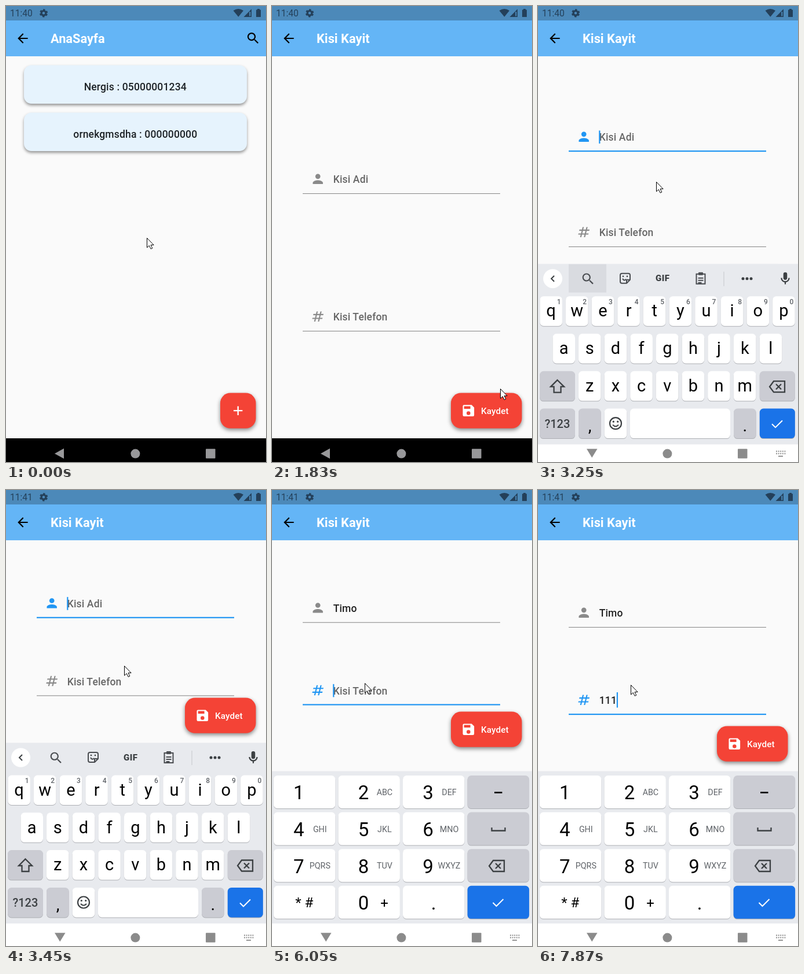
These frames come from a looping animation (449 by 789 pixels, 8 s). An HTML page:

```html
<!DOCTYPE html>
<html lang="tr">
<head>
<meta charset="utf-8">
<style>
html, body { margin: 0; width: 449px; height: 789px; overflow: hidden; }
svg { display: block; font-family: Roboto, sans-serif; }
.title { font-size: 21.8px; font-weight: 700; fill: #fff; }
.body { font-size: 17.5px; font-weight: 500; letter-spacing: .16px; }
.card { filter: drop-shadow(0 3px 2.5px #0006); }
.fab { filter: drop-shadow(0 3px 3.5px #0007); }
.mid { text-anchor: middle; }
.line { fill: none; stroke-width: 2.3; }
</style>
</head>
<body>
<svg id="stage" width="449" height="789"></svg>
<script>
const stage = document.getElementById('stage');
const BLUE = '#2196f3', RED = '#f44336', INK = '#3c4043';

const ICON = {
  back: 'M20 11H7.83l5.59-5.59L12 4l-8 8 8 8 1.41-1.41L7.83 13H20v-2z',
  search: 'M15.5 14h-.79l-.28-.27C15.41 12.59 16 11.11 16 9.5 16 5.91 13.09 3 9.5 3S3 5.91 3 9.5 5.91 16 9.5 16c1.61 0 3.09-.59 4.23-1.57l.27.28v.79l5 4.99L20.49 19l-4.99-5zm-6 0C7.01 14 5 11.99 5 9.5S7.01 5 9.5 5 14 7.01 14 9.5 11.99 14 9.5 14z',
  person: 'M12 12a4 4 0 1 0 0-8 4 4 0 0 0 0 8zm0 2c-2.67 0-8 1.34-8 4v2h16v-2c0-2.66-5.33-4-8-4z',
  hash: 'M20.5 10 21 8h-4l1-4h-2l-1 4h-4l1-4h-2L9 8H5l-.5 2h4l-1 4h-4L3 16h4l-1 4h2l1-4h4l-1 4h2l1-4h4l.5-2h-4l1-4h4zm-7 4h-4l1-4h4l-1 4z',
  save: 'M17 3H5a2 2 0 0 0-2 2v14a2 2 0 0 0 2 2h14a2 2 0 0 0 2-2V7l-4-4zm-5 16a3 3 0 1 1 0-6 3 3 0 0 1 0 6zm3-10H5V5h10v4z',
  mic: 'M12 14a3 3 0 0 0 3-3V5a3 3 0 0 0-6 0v6a3 3 0 0 0 3 3zM17 11a5 5 0 0 1-10 0H5c0 3.53 2.61 6.43 6 6.92V21h2v-3.08c3.39-.49 6-3.39 6-6.92h-2z'
};

const icon = (name, cx, cy, fill = '#000', size = 26.2) =>
  `<path d="${ICON[name]}" fill="${fill}" transform="translate(${cx - size / 2} ${cy - size / 2}) scale(${size / 24})"/>`;
const rect = (x, y, w, h, fill, r = 0, more = '') =>
  `<rect x="${x}" y="${y}" width="${w}" height="${h}" rx="${r}" fill="${fill}" ${more}/>`;
const text = (str, x, y, size, fill = '#000', more = 'class="mid"') =>
  `<text x="${x}" y="${y}" font-size="${size}" fill="${fill}" ${more}>${str}</text>`;
const line = (d, color = INK, more = '') =>
  `<path class="line" d="${d}" stroke="${color}" ${more}/>`;
const disc = (cx, cy, r, fill, more = '') =>
  `<circle cx="${cx}" cy="${cy}" r="${r}" fill="${fill}" ${more}/>`;
const key = (x, y, w, h, fill = '#fff') =>
  rect(x, y + 1, w, h, '#adafb4', 6.5) + rect(x, y, w, h, fill, 6.5);

const GREY_KEY = '#cbccd3', BLUE_KEY = '#1a73e8';
const check = (x, y) => line(`M${x - 9} ${y}l6 6 12-12`, '#fff', 'style="stroke-width:2"');
const erase = (x, y) =>
  line(`M${x - 6} ${y - 9.5}h19v19h-19l-7-9.5zm4 5l9 9m0-9l-9 9`);

function statusBar(clock) {
  const c = '#24405a';
  return rect(0, 0, 449, 25, '#4c89b9') +
    text(clock, 7, 18.3, 15.6, c, '') +
    disc(65, 12.3, 3.9, 'none', `stroke="${c}" stroke-width="3.2"`) +
    disc(65, 12.3, 5.9, 'none', `stroke="${c}" stroke-width="2.4" stroke-dasharray="3.3 2.88" stroke-dashoffset="-1.5"`) +
    `<path fill="${c}" d="M401.3 18.7L392.5 8Q401.3 2 410 8ZM410.5 19L424 5.2V19ZM432 6.5h2V5h4v1.5h2V19h-8z"/>` +
    line('M421.3 10v7.5', '#4c89b9', 'style="stroke-width:2"');
}

function navBar(s) {
  const c = s.light ? '#8b8b8b' : '#98989a';
  return `<path fill="${c}" d="${s.light ? 'M84 766.2H102.5L93.2 781.5Z' : 'M100 765.5V783.3L84 774.5Z'}"/>` +
    disc(223.4, 774.6, 8, c) + rect(345, 766.3, 16.5, 16.5, c, 1) +
    (s.switcher ? line('M411 770.4h16.5M411 774.4h16.5', c, 'stroke-dasharray="2 1.6" style="stroke-width:2"') +
      line('M415 779h8', c, 'style="stroke-width:1.8"') : '');
}

function listPage(s) {
  const card = (y, label) => `<g class="card">${rect(31, y, 385, 66.5, '#e6f3fd', 13)}</g>` +
    text(label, 223.3, y + 43.7, 17.5, '#1d2226', 'class="body mid"');
  return text('AnaSayfa', 77, 64, 21.8, '#fff', 'class="title"') +
    icon('search', 426.8, 55.8) +
    card(102.5, 'Nergis : 05000001234') + card(184.5, 'ornekgmsdha : 000000000') +
    `<g class="fab">${rect(370, 669.5, 61.5, 61.3, s.fab, 17.5)}</g>` +
    line('M393 700.2h15.4M400.7 692.5v15.4', '#fff');
}

function field(s, i, y, glyph, hint) {
  const value = s.values[i], on = s.focus === i;
  const caretTop = value ? y + 14 : y + 16.5;
  return icon(glyph, 79.2, y + 27.2, on ? BLUE : '#8a8a8a') +
    text(value || hint, 105.7, y + 34.2, 17.5, value ? '#212121' : '#666',
      `class="body"${on && value ? ' id="typed"' : ''}`) +
    (on ? rect(53, y + 51, 341, 2.2, BLUE) : rect(53, y + 52, 341, 1.1, '#8c8c8c')) +
    (on && s.caret ? rect(105.2, caretTop, 2.2, value ? 26.5 : 22.5, BLUE, 0, 'id="caret"') : '');
}

// Two fields spaced evenly between the header and the bottom of the free area
function formPage(s) {
  const gap = (s.bottom - 193) / 3, y = 87 + gap, f = s.bottom - 78.5;
  return text('Kisi Kayit', 77, 64, 21.8, '#fff', 'class="title"') +
    field(s, 0, y, 'person', 'Kisi Adi') +
    field(s, 1, y + gap + 53, 'hash', 'Kisi Telefon') +
    `<g class="fab">${rect(309, f, 122.5, 61.3, RED, 17.5)}</g>` +
    icon('save', 339.3, f + 30.7, '#fff') +
    text('Kaydet', 361, f + 36.3, 15.3, '#fff', 'font-weight="500" letter-spacing=".1"');
}

function toolStrip(s) {
  const base = disc(25.5, 463, 16.5, '#fff') + icon('mic', 427, 463, INK);
  if (s.values[0]) {
    const words = s.words.split(' ');
    return base + line('M23 458l5 5-5 5', INK, 'style="stroke-width:2"') +
      [97, 222.5, 346.5].map((x, i) => text(words[i], x, 470.8, 19.5, INK)).join('') +
      rect(156, 450, 1, 26, '#c4c6ca') + rect(288, 450, 1, 26, '#c4c6ca');
  }
  return (s.pressed ? rect(53, 438, 65, 49, '#d9dbe0') : '') + base +
    line('M28 458l-5 5 5 5', INK, 'style="stroke-width:2"') +
    icon('search', 86.5, 463.5, '#4a4d51') +
    line('M145 454h11a3 3 0 0 1 3 3v8l-6 6h-8a3 3 0 0 1-3-3v-11a3 3 0 0 1 3-3zM153 471v-6h6M146 463q3 5 6 1', '#4a4d51', 'style="stroke-width:2"') +
    disc(147, 459, 1.3, INK) + disc(154, 459, 1.3, INK) +
    text('GIF', 215.3, 467.7, 15, INK, 'class="mid" font-weight="900" letter-spacing=".6"') +
    line('M273.5 455h15v17h-15zM276.5 462h9M276.5 466h9M276.5 470h6', '#4a4d51', 'style="stroke-width:2"') +
    rect(277, 452, 8, 5, '#4a4d51', 1) + rect(320.5, 451, 1, 25, '#c4c6ca') +
    [354, 361, 368].map(x => disc(x, 463, 2.5, INK)).join('');
}

function letterPad(s) {
  const step = 44.65, pitch = 64.8, h = 51.5;
  const rows = [['qwertyuiop', 22.6], ['asdfghjkl', 44.7], ['zxcvbnm', 89.2]];
  let out = rect(0, 437, 449, 1.5, '#f0f1f3') + rect(0, 438, 449, 312, '#e8eaee') + rect(0, 750, 449, 400, '#fff') + toolStrip(s);
  rows.forEach(([letters, x0], r) => [...letters].forEach((ch, i) => {
    const x = x0 + i * step, y = 493.5 + r * pitch;
    out += key(x - 19.3, y, 38.6, h) + text(ch, x, y + 35.2, 29);
    if (!r) out += text((i + 1) % 10, x + 13.5, y + 13.7, 12, '#5f6368', 'class="mid" font-weight="500"');
  }));
  const y3 = 493.5 + 2 * pitch, y4 = y3 + pitch;
  return out + key(3, y3, 61, h, GREY_KEY) + key(382.8, y3, 61, h, GREY_KEY) +
    line('M33.5 638.5L45 650H39.5V660H27.5V650H22Z') + erase(413, 650) +
    key(3, y4, 61, h, GREY_KEY) + text('?123', 33.4, 721, 20, INK, 'class="mid" font-weight="500"') +
    key(70, y4, 38.6, h, GREY_KEY) + text(',', 89.5, 727, 29) +
    key(114.7, y4, 38.6, h) + disc(134, 713.5, 10, 'none', `stroke="${INK}" stroke-width="2.2"`) +
    disc(130.3, 710.5, 1.6, INK) + disc(137.7, 710.5, 1.6, INK) + line('M129 716q5 5.5 10 0', INK, 'style="stroke-width:2"') +
    key(159, y4, 173, h) + key(338, y4, 38.6, h, GREY_KEY) + text('.', 357.3, 727, 29) +
    key(382.8, y4, 61, h, BLUE_KEY) + check(413, 714.5);
}

function numberPad() {
  const labels = ['', 'ABC', 'DEF', 'GHI', 'JKL', 'MNO', 'PQRS', 'TUV', 'WXYZ'];
  let out = rect(0, 486, 449, 1.5, '#f0f1f3') + rect(0, 487, 449, 263, '#e8eaee') + rect(0, 750, 449, 39, '#fff');
  for (let i = 0; i < 16; i++) {
    const col = i % 4, row = i >> 2, x = 2.8 + col * 111.6, y = 494 + row * 63.6;
    out += key(x, y, 106.5, 57, col < 3 ? '#fff' : row < 3 ? GREY_KEY : BLUE_KEY);
    if (col < 3 && row < 3) {
      const n = row * 3 + col;
      out += text(n + 1, x + 43.5, y + 41.3, 33) + text(labels[n], x + 80, y + 34, 14.3, '#5f6368');
    }
  }
  return out + text('* #', 55.7, 722, 24) + text('0', 158, 726, 33) + text('+', 194, 722.5, 24) +
    text('.', 279, 726, 33) + line('M384 523.5h13.5', '#000', 'style="stroke-width:2.6"') +
    line('M379.5 584v5.5h23V584') + erase(388, 650.5) + check(390.5, 714);
}

const pointer = (x, y) => `<path transform="translate(${x + .5} ${y + .5})" fill="#fff" stroke="#000" stroke-linejoin="round"
  d="M0 0V16.5L3.8 13 6.6 18.8 9.3 17.6 6.6 12H11.6Z"/>`;

// Each step lists only what changes
const steps = [
  [0, { x: 243, y: 401, fab: RED, bottom: 748, clock: '11:40', values: ['', ''], focus: -1 }],
  [230, { x: 252, y: 420 }], [430, { x: 282, y: 476 }], [630, { x: 325, y: 554 }], [830, { x: 368, y: 630 }],
  [1030, { x: 396, y: 674, fab: '#f5564a' }], [1230, { x: 406, y: 685 }],
  [1430, { x: 407, y: 686, fab: '#de8079' }],
  [1830, { form: true, x: 394, y: 662 }], [2030, { x: 335, y: 545 }], [2230, { x: 252, y: 394 }],
  [2430, { x: 209, y: 320 }], [2630, { x: 204, y: 304 }],
  [3050, { focus: 0, caret: true, pad: 'abc', drop: 349, switcher: true }],
  [3250, { bottom: 529, drop: 8.7, light: true, pressed: true }],
  [3450, { bottom: 438, drop: 0, pressed: false, clock: '11:41' }],
  [3650, { caret: false, x: 198, y: 303 }], [4050, { caret: true }],
  [4450, { values: ['T', ''], words: 'T Thanks Thank' }],
  [4650, { values: ['Ti', ''], words: 'Ti Time Tip' }],
  [4850, { values: ['Tim', ''], words: 'Tim Time Times' }],
  [5050, { values: ['Timo', ''], words: 'Timo Time Timer' }],
  [5650, { x: 178, y: 320 }], [5850, { x: 160, y: 334, focus: 1 }],
  [6050, { pad: 'num', bottom: 462 }], [6270, { bottom: 487 }],
  [6670, { y: 337 }], [6870, { caret: false }], [7270, { caret: true }],
  [7470, { values: ['Timo', '1'] }], [7670, { values: ['Timo', '11'] }], [7870, { values: ['Timo', '111'] }]
];

function draw(s) {
  stage.innerHTML = rect(0, 0, 449, 789, '#fafafa') + rect(0, 25, 449, 62, '#64b5f6') +
    statusBar(s.clock) + icon('back', 28.9, 56) + (s.form ? formPage(s) : listPage(s)) +
    (s.light ? '' : rect(0, 748, 449, 41, '#000')) +
    (s.pad === 'num' ? numberPad() : s.pad ? `<g transform="translate(0 ${s.drop})">${letterPad(s)}</g>` : '') +
    navBar(s) + pointer(s.x, s.y);
  const typed = document.getElementById('typed'), caret = document.getElementById('caret');
  if (typed && caret) caret.setAttribute('x', 105.5 + typed.getComputedTextLength());
}

const start = performance.now();
let shown = -1;
function tick() {
  const t = (performance.now() - start) % 8000;
  const now = steps.findLastIndex(([at]) => at <= t);
  if (now !== shown) {
    shown = now;
    draw(Object.assign({}, ...steps.slice(0, now + 1).map(([, change]) => change)));
  }
  requestAnimationFrame(tick);
}
tick();
</script>
</body>
</html>
```
